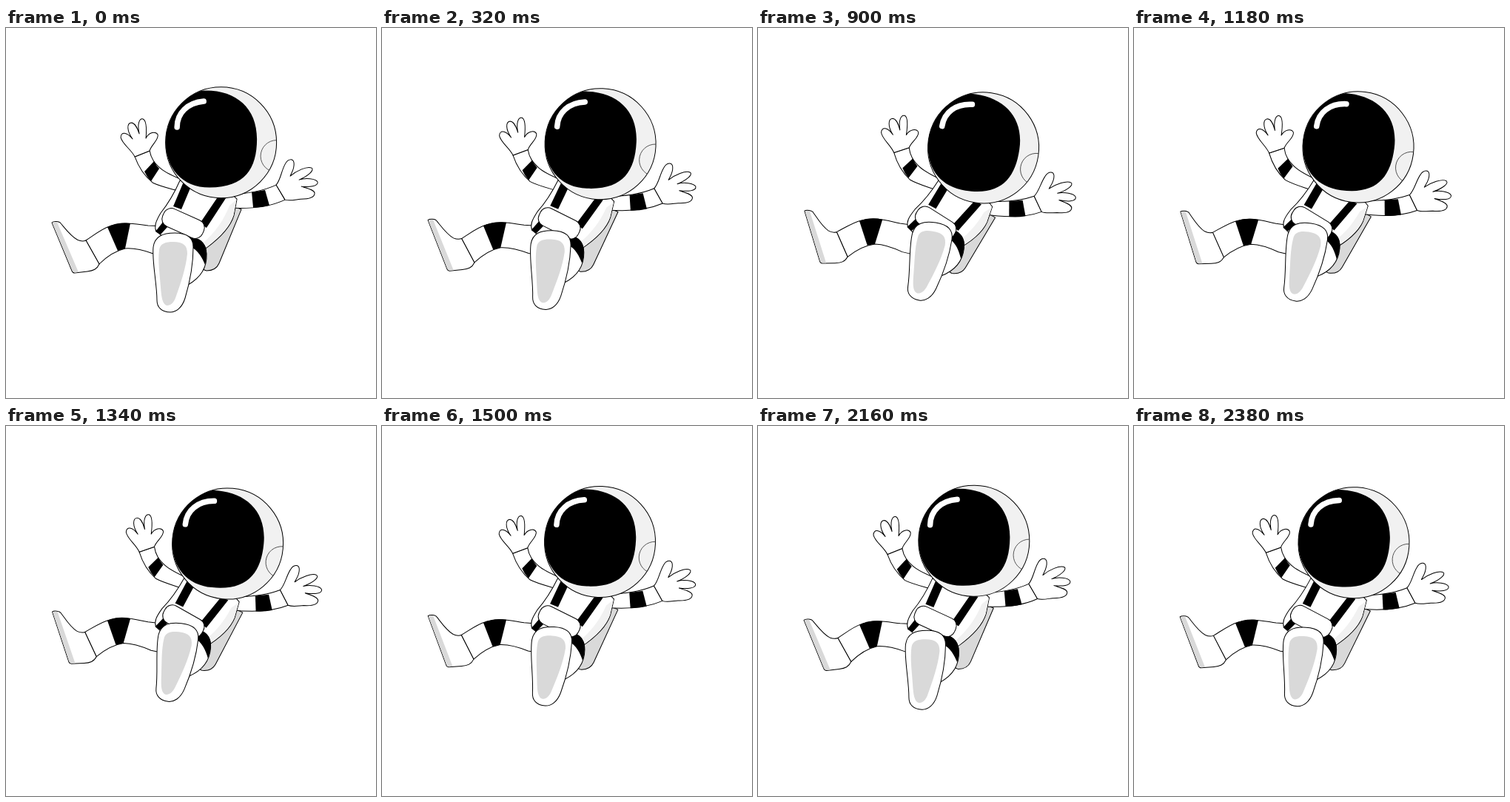
An HTML page for the animation above (2400 ms loop, 500 by 500 pixels).

```html
<!DOCTYPE html>
<html lang="en">
<head>
<meta charset="utf-8">
<title>Floating astronaut</title>
<style>
  html, body { margin: 0; width: 100%; height: 100%; overflow: hidden; background: #fff; }
  svg { display: block; width: 100%; height: 100%; }
  .line { fill: #fff; stroke: #000; stroke-width: 1; stroke-linejoin: round; stroke-linecap: round; }
  .grey { fill: #d9d9d9; }
  .pale { fill: #f1f1f1; }
</style>
</head>
<body>
<svg viewBox="0 0 500 500">
  <defs>
    <clipPath id="dome"><circle cx="290.5" cy="154.7" r="75"/></clipPath>
  </defs>

  <g class="body">
    <path class="line grey" d="M300 238L318 245L288 318C285 325 278 328 271 328Q266 327 264 322L268 290Z"/>
  </g>
  <g class="upper">
    <g id="armL">
      <path class="line" d="M194 166C196 177 201 183 209 190C216 196 225 200 240 206L236 221C222 217 208 214 198 209C187 200 179 188 174 174Z"/>
      <path d="M187 194L200 180Q203 186 207 190L196 207Q190 201 187 194Z"/>
      <path class="line" d="M174 174C169 164 157 157 155 148C155 140 163 140 171 150C163 139 163 129 169 128C175 128 178 137 180 143C177 130 180 122 185 123C190 125 190 137 189 149C193 141 202 139 205 144C207 151 196 158 194 166Z"/>
    </g>
    <g id="armR">
      <path class="line" d="M300 225C330 224 350 219 365 212L377 232C358 241 335 245 300 243Z"/>
      <path d="M332 222L350 219L356 240Q345 243 334 243Z"/>
      <path class="line" d="M365 212C371 205 372 193 377 184C381 176 388 176 389 182C390 190 386 195 384 200C392 193 407 186 413 189C417 192 408 200 396 205C404 202 419 203 421 208C422 214 410 215 399 214C405 216 417 218 417 223C417 230 405 231 398 231C390 232 383 234 377 232Z"/>
    </g>
  </g>

  <g id="legL">
    <path class="line" d="M108 287C120 279 130 271 140 268C160 261 174 265 192 267L220 268L222 308L199 305C188 301 175 297 161 298C148 301 138 307 126 319Z"/>
    <path d="M137 269Q151 262 168 264L161 298L151 301Z"/>
    <path class="line" d="M62 263C64 261 72 261 74 264C80 271 88 282 97 286.500Q103 289 108 287L126 319C123 326 118 328 110 329L93 331Q90 331 89 328Z"/>
    <path class="grey" d="M62.5 263.5Q66 262 69 262.5L98 330L93 330.5Q90 330 89.5 328Z"/>
  </g>

  <g class="body">
    <path class="line" d="M235 206C228 222 217 240 209 250C202 262 200 268 203 275L216 285L262 302L271 297C290 283 304 267 308 253L312 231L290 210Z"/>
    <path class="pale" d="M302 240L311.500 232L307.500 253C303 266 289 282 271 296.500L267 290C283 276 294 260 302 240Z"/>
    <path d="M239 210L250 214L237 245L226 241ZM287 227L297 230L271 270L262 264ZM213 261L218 269L209 279L202 275Z"/>
  </g>

  <g class="legR">
    <path class="line" d="M240 284C260 281 270 290 271 305C272 325 262 338 246 347L232 340Z"/>
    <path d="M244 283C259 281 269 288 271 301Q271.500 312 269 320C265 310 259 300 250 296Z"/>
  </g>
  <g class="body">
    <rect class="line" x="210" y="251" width="59" height="26" rx="11" transform="rotate(24 239.500 264)"/>
  </g>
  <g class="legR">
    <path class="line" d="M199 296C201 282 211 277 228 277C246 277 253 284 253 296C253 320 248 345 242 365C238 378 230 384 222 384C210 384 204 377 204 368C204 345 197 315 199 296Z"/>
    <path class="grey" d="M207 300C208 291 216 289 226 289C240 289 245 294 245 305C243 325 236 345 230 362C227 372 222 375 218 375C211 374 210 362 209 350C208 335 205 315 207 300Z"/>
  </g>

  <g class="upper">
    <circle class="line pale" cx="290.5" cy="154.7" r="75"/>
    <g clip-path="url(#dome)">
      <path d="M215 150C215 101 236 84.500 270 84.500C311 84.500 339 108 339 150C339 190 323 215.500 275 215.500C238 215.500 215 190 215 150Z"/>
      <circle cx="365.500" cy="173" r="21.500" fill="none" stroke="#333" stroke-width=".8"/>
    </g>
    <path d="M231 134C231 115 245 101 267 99" fill="none" stroke="#fff" stroke-width="7.500" stroke-linecap="round"/>
  </g>
</svg>
<script>
  const LOOP = 2400, HALF = 1000, START = 100;

  // turn (deg) about (x, y), then shift by (dx, dy), at full swing
  const parts = [
    { sel: '.upper', turn: 8.4, x: 249, y: 254, dx: 0, dy: 0, lag: 0 },
    { sel: '.body', turn: 8.4, x: 249, y: 254, dx: 2, dy: 1, lag: 0 },
    { sel: '#armL', turn: -4.5, x: 235, y: 212, dx: 0.7, dy: 0, lag: 0 },
    { sel: '#armR', turn: -2.8, x: 312, y: 232, dx: 4, dy: 0, lag: 0 },
    { sel: '#legL', turn: 5.7, x: 210, y: 285, dx: -2, dy: -1.2, lag: 60 },
    { sel: '.legR', turn: 8.8, x: 225, y: 331, dx: 4, dy: -15, lag: 50 }
  ];
  for (const p of parts) p.nodes = document.querySelectorAll(p.sel);

  const ease = u => u < 0.5 ? 0.5 * (2 * u) ** 2.6 : 1 - 0.5 * (2 - 2 * u) ** 2.6;

  function swing(t) {
    const u = ((t + START) % (2 * HALF)) / HALF;
    return ease(u > 1 ? 2 - u : u);
  }

  function draw(t) {
    for (const p of parts) {
      const k = swing(t - p.lag);
      const move = `translate(${p.dx * k} ${p.dy * k}) rotate(${p.turn * k} ${p.x} ${p.y})`;
      p.nodes.forEach(n => n.setAttribute('transform', move));
    }
  }

  function tick() {
    draw(performance.now() % LOOP);
    requestAnimationFrame(tick);
  }
  tick();
</script>
</body>
</html>
```
